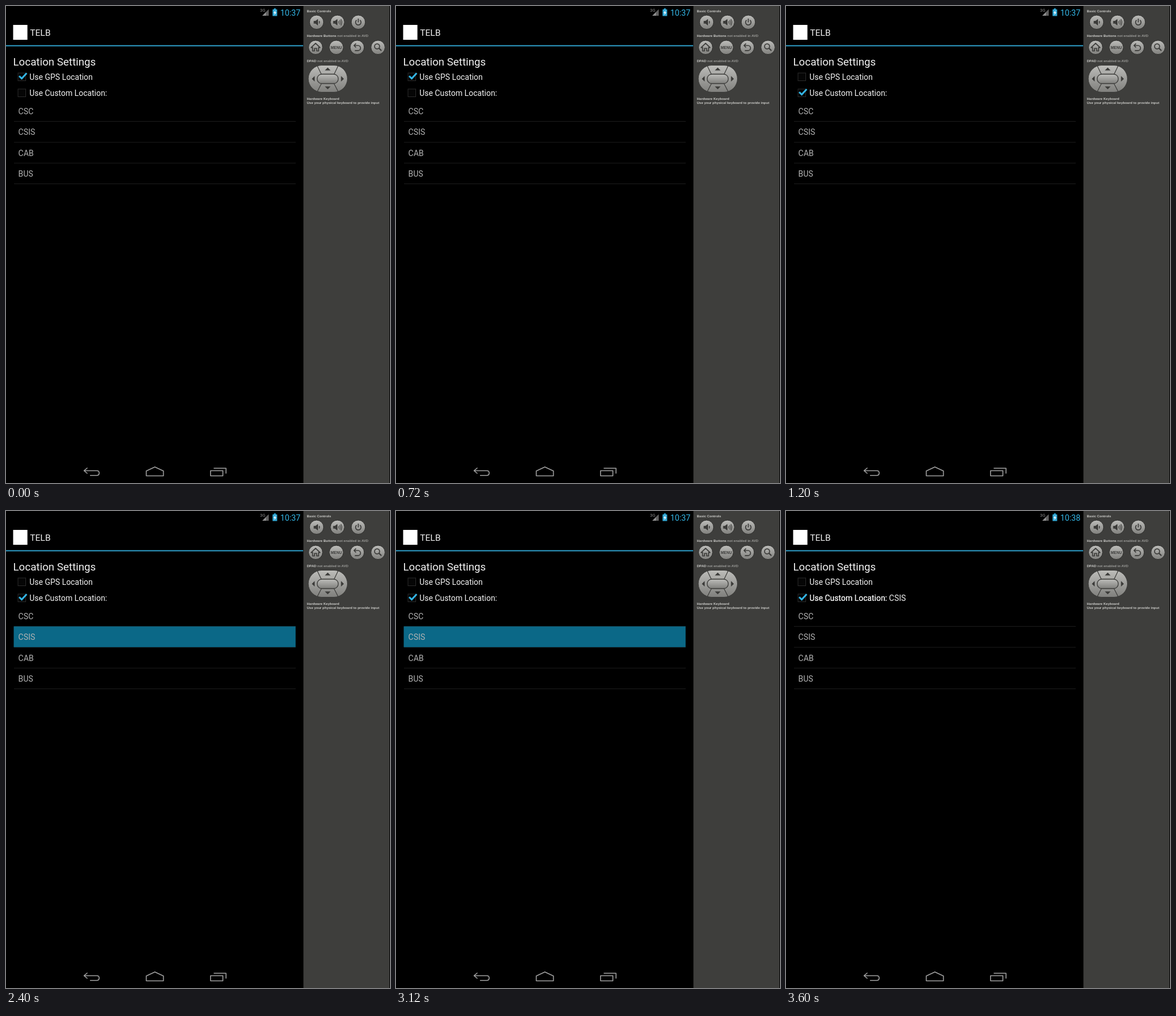
Recreate the animation shown at these times as an HTML page. Size 672x833 px, loop 4800 ms.

```html
<!DOCTYPE html>
<html lang="en">
<head>
<meta charset="utf-8">
<title>Location settings</title>
<style>
  html, body { margin: 0; width: 100%; height: 100%; overflow: hidden; background: #000; }
  svg { display: block; width: 672px; height: 833px; }
  text { font-family: Roboto, sans-serif; font-size: 13.9px; fill: #f3f3f3; }
  .row { fill: #b4b4b4; }
  .title { font-size: 18.6px; }
  .app { font-size: 15.5px; }
  .clock { font-size: 14.2px; fill: #33b5e5; text-anchor: end; }
  .net { font-size: 7.5px; fill: #8c8c8c; }
  .panel text { font: bold 6px "Liberation Sans", Arial, sans-serif; fill: #c9c9c6; }
  .panel .dim { fill: #9b9b98; }
  .panel .menu { font-size: 6.6px; fill: #3b3b39; text-anchor: middle; }
  .rules { stroke: #1d1d1d; }
  .nav { fill: none; stroke: #a0a0a0; stroke-width: 1.6; stroke-linejoin: round; }
  .icon { fill: none; stroke: #3b3b39; stroke-width: 1.7; stroke-linejoin: round; }
  .solid { fill: #3b3b39; stroke: none; }

  .gps, .custom, .pick, .late, .early { animation: 4.8s step-end infinite; }
  .gps { animation-name: gps; }
  .custom { animation-name: custom; }
  .pick { animation-name: pick; }
  .late { animation-name: late; }
  .early { animation-name: early; }
  @keyframes gps { 0% { opacity: 1 } 25%, 100% { opacity: 0 } }
  @keyframes custom { 0% { opacity: 0 } 25%, 100% { opacity: 1 } }
  @keyframes pick { 0% { opacity: 0 } 50% { opacity: 1 } 75%, 100% { opacity: 0 } }
  @keyframes late { 0% { opacity: 0 } 75%, 100% { opacity: 1 } }
  @keyframes early { 0% { opacity: 1 } 75%, 100% { opacity: 0 } }
</style>
</head>
<body>
<svg viewBox="0 0 672 833">
  <defs>
    <linearGradient id="metal" x1="0" y1="0" x2="0" y2="1">
      <stop offset="0" stop-color="#bdbdba"/>
      <stop offset="1" stop-color="#7f7f7c"/>
    </linearGradient>
    <circle id="key" r="12.3" fill="url(#metal)" stroke="#2c2c2a" stroke-width="1"/>
    <rect id="box" x="21" y="117" width="13.5" height="13.5" fill="#050505" stroke="#2b2b2b"/>
    <path id="tick" d="M23 122.3 L27.6 126.6 L36.2 117.2" fill="none" stroke="#33b5e5" stroke-width="3"/>
    <clipPath id="pad"><rect x="529" y="103.5" width="68.5" height="47" rx="23.5"/></clipPath>
  </defs>

  <rect width="672" height="833"/>

  <!-- status bar -->
  <text class="net" x="444.5" y="10">3G</text>
  <path d="M448.5 17 L460 5.5 V17 Z" fill="#4c4c4c"/>
  <path d="M448.5 17 L455 10.5 V17 Z" fill="#8f8f8f"/>
  <path d="M456 9.5V17 M458 7.5V17" stroke="#777" stroke-width="1"/>
  <path d="M466.5 6 H468.7 V4.2 H472.3 V6 H474.5 V17.5 H466.5 Z" fill="#33a9d6"/>
  <path d="M471.8 7.5 L468 12.3 H470.2 L469.3 16 L473.2 11 H471 Z" fill="#fff"/>
  <text class="clock early" x="515.3" y="16.5">10:37</text>
  <text class="clock late" x="515.3" y="16.5">10:38</text>

  <!-- app bar -->
  <rect x="12.5" y="33" width="25" height="26" fill="#fff"/>
  <text class="app" x="42" y="52">TELB</text>
  <rect y="68.4" width="520" height="2" fill="#2f9fca"/>

  <!-- settings -->
  <text class="title" x="12.6" y="104">Location Settings</text>
  <use href="#box"/>
  <use href="#box" y="28"/>
  <use href="#tick" class="gps"/>
  <use href="#tick" class="custom" y="28"/>
  <text x="41" y="129">Use GPS Location</text>
  <text x="41" y="157">Use Custom Location:<tspan class="tail"></tspan></text>
  <text class="late" x="41" y="157">Use Custom Location: CSIS</text>

  <path class="rules" d="M14 201.5H507 M14 238H507 M14 274.3H507 M14 310.5H507"/>
  <rect class="pick" x="13.5" y="201.5" width="493.3" height="36.3" fill="#0b6887"/>
  <text class="row" x="21.6" y="189">CSC</text>
  <text class="row" x="21.6" y="225.3">CSIS</text>
  <text class="row" x="21.6" y="262">CAB</text>
  <text class="row" x="21.6" y="298.3">BUS</text>

  <!-- navigation -->
  <g class="nav">
    <path d="M142.5 806.5 L136.5 811.5 L142.5 816.5 M137 811.5 H159 Q163 811.5 163 815.5 T159 819.8 H147"/>
    <path d="M245.5 820.5 V812 L260.5 805 L275.5 812 V820.5 Z"/>
    <path d="M358 811.5 H379.5 V820.5 H358 Z M363.5 807.2 H385 V816.5"/>
  </g>

  <!-- side panel -->
  <g class="panel">
    <rect x="520.5" width="150.5" height="833" fill="#3e3e3c"/>
    <text x="526.5" y="11.4">Basic Controls</text>
    <text x="526.5" y="53.6">Hardware Buttons <tspan class="dim">not enabled in AVD</tspan></text>
    <text x="526.5" y="98">DPAD <tspan class="dim">not enabled in AVD</tspan></text>
    <text x="526.5" y="163.6">Hardware Keyboard</text>
    <text x="526.5" y="171.2">Use your physical keyboard to provide input</text>

    <use href="#key" x="543.5" y="28.3"/>
    <use href="#key" x="580" y="28.3"/>
    <use href="#key" x="616.5" y="28.3"/>
    <use href="#key" x="541.8" y="72.3"/>
    <use href="#key" x="578" y="72.3"/>
    <use href="#key" x="614.5" y="72.3"/>
    <use href="#key" x="651" y="72.3"/>

    <path class="solid" d="M538.5 26 H541.5 L546 22.8 V34 L541.5 30.8 H538.5 Z"/>
    <path class="icon" stroke-width="1.2" d="M548 26.3 Q549.4 28.4 548 30.5"/>
    <path class="solid" d="M572.5 26 H575.5 L580 22.8 V34 L575.5 30.8 H572.5 Z"/>
    <path class="icon" style="stroke-width:1.2" d="M582 26.3 Q583.4 28.4 582 30.5 M584 24.6 Q586.6 28.4 584 32.2 M586 23 Q589.6 28.4 586 33.8"/>
    <path class="icon" d="M613.6 24.6 A4.8 4.8 0 1 0 619.4 24.6 M616.5 22 V28.5"/>
    <path class="icon" d="M534 72.6 L541.8 65.2 L549.6 72.6 H547 V78.5 H543.7 V74 H539.9 V78.5 H536.6 V72.6 Z"/>
    <text class="menu" x="578" y="74.8">MENU</text>
    <path class="icon" d="M609 69 H616 A4.4 4.4 0 0 1 616 77.8 H610.5 M612.5 65.5 L609 69 L612.5 72.5"/>
    <circle class="icon" cx="649.4" cy="70.5" r="4.4"/>
    <path class="icon" style="stroke-width:2.2" d="M652.7 73.8 L657 78"/>

    <g clip-path="url(#pad)">
      <rect x="529" y="103" width="69" height="48" fill="url(#metal)"/>
      <path class="icon" style="stroke-width:1.2" d="M544 103 L552 119.5 M582 103 L574 119.5 M544 151 L552 135.5 M582 151 L574 135.5"/>
    </g>
    <rect class="icon" style="stroke-width:1" x="529" y="103.5" width="68.5" height="47" rx="23.5"/>
    <rect x="544.5" y="119" width="37" height="16.5" rx="8.2" fill="url(#metal)" stroke="#3b3b39" stroke-width="1.3"/>
    <path class="solid" d="M558 112.5 L563 107.5 L568 112.5 Z M558 140.5 L563 145.5 L568 140.5 Z M540.2 122.3 L535.2 127.2 L540.2 132.1 Z M586.3 122.3 L591.3 127.2 L586.3 132.1 Z"/>
  </g>
</svg>
</body>
</html>
```
